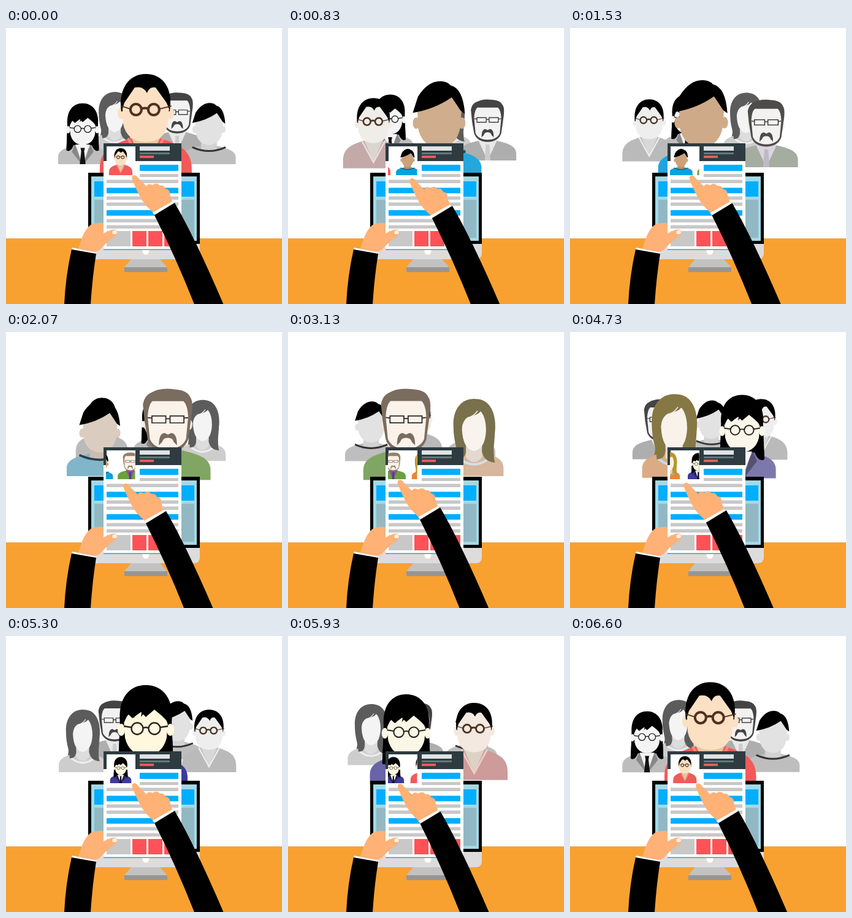
Animation, 450 px wide and 450 px high, one loop 7.01 s. Source, as an HTML page with a canvas:

```html
<!DOCTYPE html>
<html>
<head>
<meta charset="utf-8">
<style>
html, body { margin: 0; width: 100%; height: 100%; overflow: hidden; background: #fff; }
canvas { display: block; width: 100vw; height: 100vh; }
</style>
</head>
<body>
<canvas id="stage" width="450" height="450"></canvas>
<script>
const ctx = document.getElementById('stage').getContext('2d');
const LOOP = 7010, TURN = LOOP / 5, SLIDE = 1000;

const oval = (x, y, rx, ry = rx) =>
  `M${x - rx},${y}a${rx},${ry} 0 1 0 ${2 * rx},0a${rx},${ry} 0 1 0 ${-2 * rx},0z`;
const torso = (w, top) =>
  `M${-w},0V-18C${-w},${-top * .75} ${-w * .7},${-top * .86} -24,${-top}H24` +
  `C${w * .7},${-top * .86} ${w},${-top * .75} ${w},-18V0z`;
const ears = y => oval(-40, y, 6, 10) + oval(40, y, 6, 10);

// Part: path, front colour, faded colour, line width (filled when absent).
// Bodies stand on (0,0) at front size.
const part = (d, colour, faded = colour, line = 0) =>
  ({ path: new Path2D(d), colour, faded, line });

const redMan = [
  part(torso(75, 68), '#f25a58', '#bababa'),
  part('M-24,-70L0,-17L24,-70z', '#e5c6a0', '#d8d8d8'),
  part('M-29,-68L0,-15L29,-68', '#f48a80', '#ededed', 4),
  part(ears(-109), '#fce0c4', '#eeeeee'),
  part('M-40,-112C-45,-150 -27,-173 0,-173C28,-173 45,-150 39,-112z', '#000000'),
  part('M-38,-116L-35,-126L-18,-151Q-4,-154 2,-142Q6,-153 16,-151L34,-126L38,-116L36,-92Q31,-63 0,-62Q-31,-63 -37,-92z', '#fce0c4', '#eeeeee'),
  part(oval(-16, -115, 9) + oval(13, -115, 9) + 'M-7,-116Q-1,-119 4,-116', '#50301e', '#4a3428', 4),
  part('M-40,-121L-25,-116M22,-116L42,-121', '#50301e', '#4a3428', 1.8)
];
const blueMan = [
  part(torso(74, 50), '#05a2e2', '#bebebe'),
  part('M-22,-62H22V-42Q0,-33 -22,-42z', '#b8926d', '#d2d2d2'),
  part('M-46,-47Q0,-26 46,-47', '#20526b', '#333333', 5),
  part(ears(-96), '#cba27c', '#e2e2e2'),
  part('M-38,-122L22,-146L39,-118L37,-88Q30,-54 0,-53Q-30,-54 -37,-88z', '#cba27c', '#e2e2e2'),
  part('M-46,-114L-37,-142Q-20,-169 2,-169Q14,-169 20,-162Q42,-157 45,-112L38,-117L22,-141Q-8,-120 -46,-114z', '#000000')
];
const beardMan = [
  part(torso(80, 56), '#6ba03e', '#aeaeae'),
  part('M-27,-58L0,0L27,-58z', '#8050a8', '#e8e8e8'),
  part('M-5,-45H5L8,0H-8z', '#5c3a88', '#cccccc'),
  part(ears(-104), '#f5e2d2', '#eeeeee'),
  part('M-44,-112L-47,-142Q-44,-158 -33,-163Q-15,-174 12,-170Q36,-169 42,-155Q49,-146 43,-112L38,-76Q30,-53 0,-52Q-30,-53 -38,-76z', '#94806c', '#444444'),
  part('M-38,-118Q-37,-141 -29,-148H29Q37,-141 38,-118L34,-77Q27,-59 0,-58Q-27,-59 -34,-77z', '#fff2e6', '#f2f2f2'),
  part('M-17,-65Q-17,-88 -6,-88L0,-85L6,-88Q17,-88 17,-65L11,-71Q9,-79 0,-79Q-9,-79 -11,-71z', '#94806c', '#444444'),
  part('M-30,-120H-4V-107H-30zM4,-120H30V-107H4zM-4,-115H4M-38,-117L-30,-116M30,-116L38,-117', '#332b28', '#222222', 2)
];
const blonde = [
  part('M-46,-112C-48,-152 -25,-178 10,-172C42,-168 50,-128 47,-103Q40,-60 47,-30Q20,-28 0,-50Q-24,-30 -42,-42Q-34,-70 -46,-112z', '#b5982c', '#5c5c5c'),
  part(torso(66, 52), '#ea8636', '#cdcdcd'),
  part('M-18,-68H18V-42Q0,-20 -18,-42z', '#ecd2b8', '#dddddd'),
  part('M-36,-42Q0,-10 36,-42', '#85cfe8', '#eeeeee', 5),
  part('M-46,-112C-46,-75 -36,-62 -36,-38Q-18,-38 -18,-58L-27,-104zM47,-112C47,-70 40,-58 47,-30Q20,-32 18,-58L27,-104z', '#b5982c', '#5c5c5c'),
  part('M-27,-106Q-26,-124 -14,-132Q8,-137 16,-144Q27,-130 27,-102Q25,-60 0,-56Q-25,-60 -27,-106z', '#fff0e0', '#f4f4f4'),
  part('M-14,-130Q0,-134 8,-146M-2,-132Q9,-135 15,-144', '#fff0e0', '#f4f4f4', 2)
];
const girl = [
  part('M-42,-106C-46,-148 -26,-168 0,-168C27,-168 47,-146 42,-106L45,-38H-45z', '#000000'),
  part(torso(68, 52), '#40389c', '#bebebe'),
  part('M-20,-54L0,0L20,-54z', '#ffffff', '#f4f4f4'),
  part('M-22,-54L-30,-34L-3,0L-16,-42zM22,-54L30,-34L3,0L16,-42z', '#25205c', '#888888'),
  part('M-6,-45H6L4,-36L8,0H-8L-4,-36z', '#111111'),
  part('M-42,-110L-45,-38Q-34,-32 -26,-50L-32,-90zM42,-110L45,-38Q34,-32 26,-50L32,-90z', '#000000'),
  part(ears(-95), '#fff8df', '#f4f4f4'),
  part('M-36,-112L-28,-120L-22,-114L-8,-124L0,-116L14,-128L26,-118L36,-108L34,-82Q27,-54 0,-53Q-27,-54 -34,-82z', '#fff8df', '#f4f4f4'),
  part('M-36,-106L-22,-136L-20,-114L-5,-134L-8,-116L10,-138L24,-134L36,-104L40,-130L20,-156H-22L-38,-130z', '#000000'),
  part(oval(-14, -97, 9.5) + oval(14, -97, 9.5) + 'M-4,-98Q0,-100 4,-98M-36,-101L-23,-99M23,-99L36,-101', '#2b2622', '#222222', 2.4)
];
const people = [redMan, blueMan, beardMan, blonde, girl];

// Carousel track: distance from front, x offset, floor y, scale.
const track = [
  [0, 0, 248, 1], [.34, 37, 241, .865], [.67, 75, 235, .73], [1, 103, 222, .59],
  [1.34, 92, 210, .575], [2, 51, 201, .56], [2.5, 0, 203, .54]
];

function along(dist) {
  const i = Math.max(1, track.findIndex(k => k[0] >= dist));
  const a = track[i - 1], b = track[i], f = (dist - a[0]) / (b[0] - a[0]);
  return a.map((v, j) => v + (b[j] - v) * f);
}

function mix(a, b, f) {
  const ch = (c, i) => parseInt(c.substr(i, 2), 16);
  return `rgb(${[1, 3, 5].map(i => Math.round(ch(a, i) + (ch(b, i) - ch(a, i)) * f))})`;
}

function drawPerson(parts, x, y, scale, fade) {
  ctx.save();
  ctx.translate(x, y);
  ctx.scale(scale, scale);
  for (const { path, colour, faded, line } of parts) {
    ctx.fillStyle = ctx.strokeStyle = mix(colour, faded, fade);
    ctx.lineWidth = line;
    line ? ctx.stroke(path) : ctx.fill(path);
  }
  ctx.restore();
}

function rect(colour, x1, y1, x2, y2) {
  ctx.fillStyle = colour;
  ctx.fillRect(x1, y1, x2 - x1, y2 - y1);
}

function shape(colour, d) {
  ctx.fillStyle = colour;
  ctx.fill(new Path2D(d));
}

function drawMonitor() {
  rect('#f8a131', 0, 343, 450, 450);
  shape('#dcdcdc', 'M134,352H316V367Q316,377 306,377H144Q134,377 134,367z');
  rect('#000', 134, 236, 316, 352);
  rect('#a3d9e6', 139, 242, 311, 347);
  for (const [l, r] of [[144, 170], [275, 307]]) {
    rect('#00aeff', l, 250, r, 275);
    rect('#92b8c4', l, 280, r, 342);
  }
  shape('#fff', oval(228, 364, 5.5));
  shape('#c2c2c2', 'M204,377H251L263,390H193z');
  rect('#989693', 193, 390, 263, 398);
}

function drawPage(turn, p) {
  rect('#fff', 159, 188, 286, 361);
  rect('#2ca0cc', 159, 360.5, 286, 362);
  rect('#2e3b40', 159, 188, 286, 217);
  rect('#fff', 164, 193, 211, 241);
  rect('#dfe3e4', 218, 193, 267, 200);
  rect('#62787a', 218, 203, 267, 206);
  rect('#f4595c', 218, 208, 241, 212);
  rect('#00aeff', 218, 223, 281, 233);
  rect('#c8c8c8', 218, 238, 281, 243);
  for (const y of [247.5, 274.5, 284.5, 311.5, 321.5]) rect('#c8c8c8', 164, y, 281, y + 5.5);
  for (const y of [260.5, 297]) rect('#00aeff', 164, y, 281, y + 9);
  rect('#c8c8c8', 164, 331, 203, 356);
  for (const x of [206, 232, 258]) rect('#ff5257', x, 331, x + 23, 356);

  ctx.save();
  ctx.beginPath();
  ctx.rect(163, 193, 47.5, 47);
  ctx.clip();
  for (const step of [0, 1])
    drawPerson(people[(turn + step) % 5], 187 + 47 * (step - p), 240, .255, 0);
  ctx.restore();
}

function drawHands(p) {
  const skin = '#ffb176';
  shape(skin, 'M118,360C122,348 126,330 138,321Q146,317 159,318V335L172,329Q180,327 182,333Q180,339 171,344L157,357Q150,366 144,365z');
  shape('#fff3e8', oval(177, 333, 3.8, 3.2));
  shape('#fff', 'M108,358L147,366L146,369L107,362z');
  shape('#000', 'M107,361L147,368Q141,405 138,450H95Q97,405 107,361z');

  // Swipe left, then return in a low arc.
  const out = .34, back = (p - out) / (1 - out);
  const dx = p < out ? -28 * p / out : -28 * (1 - back);
  const dy = p < out ? p / out : 1 - back + 6.5 * Math.sin(Math.PI * back);
  ctx.save();
  ctx.translate(dx, dy);
  shape(skin, 'M206,247Q204,241 209,240Q213,240 216,245L229,258Q232,252 239,256Q246,251 251,257Q258,256 260,262Q268,263 267,271L272,286L241,302L229,290Q218,278 206,247z');
  shape('#fff', 'M239,301L271,283L275,287L243,306z');
  shape('#000', 'M242,305L275,285Q310,345 360,463H312Q280,380 242,305z');
  ctx.restore();
}

function draw(time) {
  const t = time % LOOP;
  const turn = Math.floor(t / TURN);
  const p = Math.min(1, (t - turn * TURN) / SLIDE);

  rect('#fff', 0, 0, 450, 450);
  people
    .map((parts, i) => {
      const u = ((i - turn - p + 12.5) % 5) - 2.5;
      return { parts, side: Math.sign(u), dist: Math.abs(u) };
    })
    .sort((a, b) => b.dist - a.dist)
    .forEach(({ parts, side, dist }) => {
      const [, x, y, scale] = along(dist);
      drawPerson(parts, 228 + side * x, y, scale, Math.min(1, dist));
    });
  drawMonitor();
  drawPage(turn, p);
  drawHands(p);
}

const start = performance.now();
function tick() {
  draw(performance.now() - start);
  requestAnimationFrame(tick);
}
tick();
</script>
</body>
</html>
```
